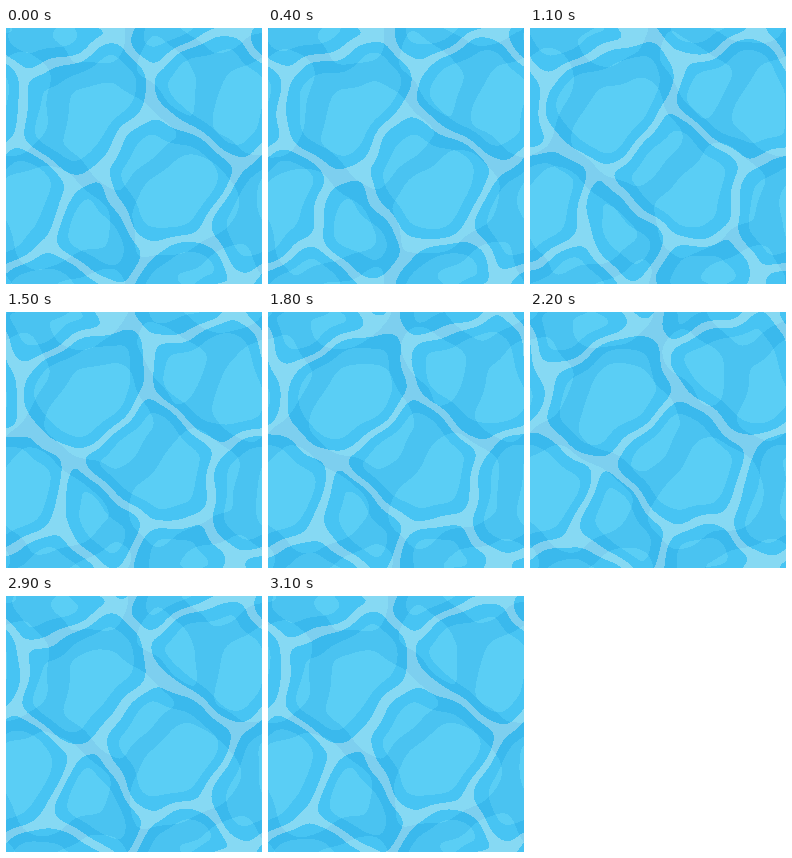
Write an HTML page with a canvas that moves like this. It is 256x256 px and loops after 3.2 s.

```html
<!DOCTYPE html>
<html lang="en">
<head>
<meta charset="utf-8">
<title>Water</title>
<style>
html, body { margin: 0; width: 100%; height: 100%; overflow: hidden; background: #86d9f3; }
canvas { display: block; width: 100vw; height: 100vh; }
</style>
</head>
<body>
<canvas id="water" width="256" height="256"></canvas>
<script>
const SIZE = 256, LOOP = 3200, STEP = 100, TAU = 2 * Math.PI;
const GAP = 4, RIM = 15, BAND = 10, ROUNDING = 5;

// Drifting cells of a tiling, weighted Voronoi net: x, y, weight, sway x, sway y.
const cells = [
  [78, 77, 1000, -4, -5],
  [209, 72, 1000, 4, 8],
  [156, 147, 1500, 9, 0],
  [87, 206, -700, -4, -6],
  [44, 262, -400, 0, -8],
  [3, 182, 500, 1, -3],
  [174, 246, -1700, 2, -4]
];

// Tones for water, rim and core, each plain and under a shadow band.
const tones = [
  ['#86d9f3', '#7dcfef'],
  ['#47c4f3', '#3ab9ed'],
  ['#5acef5', '#4ac3f1']
].map(pair => pair.map(hex => [1, 3, 5].map(i => parseInt(hex.slice(i, i + 2), 16))));

const ctx = document.getElementById('water').getContext('2d');
const image = ctx.createImageData(SIZE, SIZE);
const wrap = d => d - SIZE * Math.round(d / SIZE);
const wave = (v, cycles, phase) => Math.sin(TAU * cycles * v / SIZE + phase);

// Returns a function giving the rounded distance from a point to the net.
function netAt(angle) {
  const seeds = cells.map(([x, y, weight, swayX, swayY]) => ({
    x: x + swayX * Math.cos(angle), y: y + swayY * Math.sin(angle), weight
  }));
  const dx = [], dy = [], power = [];
  return (px, py) => {
    const x = px + 3 * wave(py, 3, angle) + 2 * wave(px + py, 4, -angle);
    const y = py + 3 * wave(px, 3, -angle) + 2 * wave(px - py, 4, angle);
    let near = 0;
    seeds.forEach((s, i) => {
      dx[i] = wrap(s.x - x);
      dy[i] = wrap(s.y - y);
      power[i] = dx[i] * dx[i] + dy[i] * dy[i] - s.weight;
      if (power[i] < power[near]) near = i;
    });
    let sum = 0;
    for (let i = 0; i < seeds.length; i++) {
      if (i === near) continue;
      const apart = Math.hypot(dx[i] - dx[near], dy[i] - dy[near]);
      sum += Math.exp((power[near] - power[i]) / (2 * apart * ROUNDING));
    }
    return -ROUNDING * Math.log(sum);
  };
}

function draw(time) {
  const angle = TAU * time / LOOP;
  const net = netAt(angle), shadow = netAt(angle + Math.PI);
  for (let y = 0, n = 0; y < SIZE; y++) {
    for (let x = 0; x < SIZE; x++, n += 4) {
      const depth = net(x, y);
      const level = depth < GAP ? 0 : depth < RIM ? 1 : 2;
      // The shadow net is the same one turned half round.
      const shaded = shadow(SIZE - x, SIZE - y) < BAND ? 1 : 0;
      const [r, g, b] = tones[level][shaded];
      image.data[n] = r;
      image.data[n + 1] = g;
      image.data[n + 2] = b;
      image.data[n + 3] = 255;
    }
  }
  ctx.putImageData(image, 0, 0);
}

const start = performance.now();
let shown = -1;
function tick() {
  const step = Math.floor((performance.now() - start) % LOOP / STEP);
  if (step !== shown) draw(step * STEP);
  shown = step;
  requestAnimationFrame(tick);
}
tick();
</script>
</body>
</html>
```
